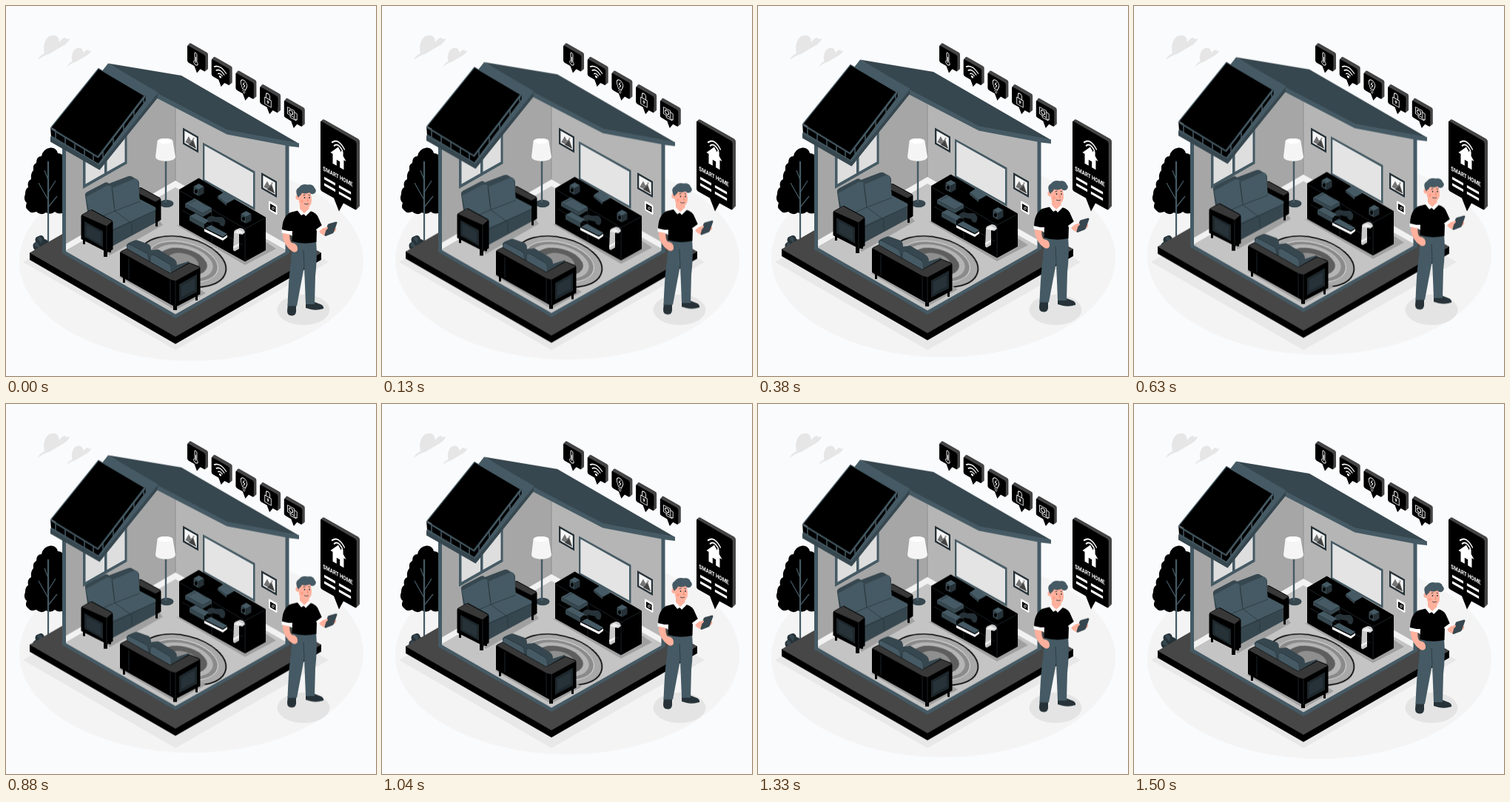
These frames come from a looping animation (500 px wide and 500 px high, 1.54 s). An HTML page:

```html
<!DOCTYPE html>
<html lang="en">
<head>
<meta charset="utf-8">
<title>Smart home</title>
<style>
html,body{margin:0;width:100%;height:100%;overflow:hidden;background:#fafbfd}
svg{display:block;width:100%;height:100%}
.k{fill:#000}.d{fill:#37474f}.s{fill:#455a64}.n{fill:#263238}.w{fill:#fff}
.g{fill:#e6e6e6}.skin{fill:#ffb19d}.top{fill:#383838}.inset{fill:#1d272c}
.line{fill:none;stroke:#455a64;stroke-linejoin:round}
.dark{fill:none;stroke:#263238;stroke-width:.7}
.icon{fill:none;stroke:#fff;stroke-width:1;stroke-linecap:round;stroke-linejoin:round}
text{font:bold 8px Roboto,sans-serif;fill:#fff;text-anchor:middle}
</style>
</head>
<body>
<svg viewBox="0 0 500 500">
<defs>
  <g id="frame">
    <path class="n" d="M0 0L21 12V34L0 22Z"/>
    <path fill="#f5f5f5" d="M2.300 4L18.800 13.400V30L2.300 20.600Z"/>
    <path fill="#757575" d="M3.300 19.500L8 11.500 11 17.500 14 15 18 28Z"/>
    <path fill="#424242" d="M8 23L13.500 17.500 18 28.300Z"/>
    <circle cx="14.500" cy="14.500" r="1.200" fill="#9e9e9e"/>
  </g>
  <g id="speaker">
    <path class="s" d="M0 4L7 0 14 4 7 8Z"/>
    <path class="d" d="M0 4L7 8V17L0 13Z"/>
    <path class="n" d="M7 8L14 4V13L7 17Z"/>
    <ellipse class="k" cx="3.500" cy="10.500" rx="1.900" ry="2.800"/>
  </g>
  <g id="bubble">
    <path fill="#454545" d="M0 4L3 .4Q4 0 5 .5L26 12.500Q28 13.700 28 15.500V35L24.500 38 23 17Z"/>
    <path class="k" d="M0 5Q0 3 2 4L22.500 15.700Q24.500 17 24.500 19V37Q24.500 39.300 22.500 38L17.500 35.300 13 40.500 9.500 31 2 26.700Q0 25.500 0 23.500Z"/>
  </g>
  <path id="cloud" class="g" d="M43 73Q45 67 52 64C49 53 54 41 61 40C67 38 72 42 72 49C76 43 81 41 82 45Q86 43 86 45Q82 52 75 55L58 65Q50 67 43 73Z"/>
</defs>

<ellipse class="float" cx="250.500" cy="345" rx="232.500" ry="134.500" fill="#f4f4f4"/>
<use href="#cloud"/>
<use href="#cloud" transform="translate(50.500 27) scale(.75)"/>
<path fill="#e8e8e8" d="M23 346L229 227 436 346 229 465Z"/>
<ellipse cx="402" cy="410.500" rx="35.500" ry="20.500" fill="#e4e4e4"/>

<g id="tree">
  <path class="k" d="M60 191.500Q68 191 70 199Q77 199 80 207V278Q72 283 66 278Q60 283 54 279Q47 284 41 278Q33 281 30 276Q25 273 28 266Q23 262 26 254Q26 247 30 245Q28 237 34 234Q33 226 37 222Q36 214 41 212Q41 203 48 203Q50 193 60 191.500Z"/>
  <path class="line" stroke-width="2.200" d="M57 210V323"/>
  <path class="line" stroke-width="1.300" d="M57 262L44 239M57 252L67 236M57 235L52 222M57 272L69 257"/>
  <path class="n" d="M37 327Q35 321 40 319Q38 312 44 311Q50 308 52 315Q58 316 57 322L56 330H39Z"/>
  <path class="d" d="M39 325Q37 320 42 319L47 327ZM42 314Q46 309 49 315L48 321Z"/>
</g>

<g id="bubbles">
  <use href="#bubble" x="245" y="50"/>
  <use href="#bubble" x="277.700" y="68.600"/>
  <use href="#bubble" x="310.400" y="87.200"/>
  <use href="#bubble" x="343.100" y="105.800"/>
  <use href="#bubble" x="375.800" y="124.400"/>
</g>
<g class="icon">
  <g transform="matrix(.9 .5 0 .9 256.500 72)">
    <path d="M-1.600 3V-8A1.600 1.600 0 0 1 1.600 -8V3A3 3 0 1 1 -1.600 3Z"/><path d="M0 -3V5"/>
  </g>
  <g transform="matrix(1 .57 0 1 289.500 90)">
    <path d="M-8 -3.500Q0 -11 8 -3.500M-5.300 0Q0 -5.500 5.300 0M-2.700 3Q0 .5 2.700 3" stroke-width="1.400"/><circle cy="5.800" r="1" fill="#fff"/>
  </g>
  <g transform="matrix(.85 .5 0 .95 321.500 108)">
    <path d="M-2.500 5C-2.500 2 -5 1 -5 -3A5 5 0 0 1 5 -3C5 1 2.500 2 2.500 5ZM-2 7.500H2M-1 9.800H1M.8 -5L-1.500 -1.300H1.500L-.6 2.500"/>
  </g>
  <g transform="matrix(.85 .5 0 .95 354 127)">
    <path d="M-5 -1.500H5V8H-5ZM-3 -1.500V-6A3 3 0 0 1 3 -6V-1.500M0 3.500V5.200"/><circle cy="2.500" r="1.200"/>
  </g>
  <g transform="matrix(.95 .54 0 .95 387 145.500)">
    <path d="M-6.500 -5.500H3V4H-6.500ZM3 -3.500H6.500V5.500H2M-3 4V7H5V5.500" stroke-width=".8"/><circle cx="-2" cy="-.8" r="2.700"/>
  </g>
</g>

<g id="sign">
  <path fill="#454545" d="M425 156L428 153.500Q429.500 153 431 154L476 179.500Q478 181 478 183V270.500L473.500 275 472 184Z"/>
  <path class="k" d="M425 157.500Q425 155 427 156.300L471.500 182Q473.800 183.500 473.800 186V274Q473.800 276.300 471.500 275L456 266.500 450 277.500 443 259.500 427 250.500Q425 249 425 247Z"/>
  <g transform="matrix(.88 .5 0 1 449 204)">
    <path class="icon" style="stroke-width:1.800" d="M-9.500 -15Q0 -26 9.500 -15M-6.300 -12Q0 -19.500 6.300 -12"/>
    <path class="w" d="M0 -13.500L12 0H8.500V13H2.500V5H-2.500V13H-8.500V0H-12ZM4.500 -11H7.500V-4L4.500 -7Z"/>
    <path class="w" d="M-21.500 37.500H-4.500V41H-21.500ZM1 37.500H19.500V41H1ZM-21.500 46H-4.500V49.500H-21.500ZM1 46H19.500V49.500H1Z"/>
  </g>
  <text transform="matrix(.78 .43 0 1 448.500 233)">SMART HOME</text>
</g>

<g id="shell" class="float">
  <path class="k" d="M32 333L229 446 426 333V343L229 456.700 32 343Z"/>
  <path fill="#474747" d="M32 333.500L229 220 426 333.500 229 447Z"/>
  <path class="s" d="M76 331L229 242 383 331V334L229 422 76 334Z"/>
  <path fill="#c4c4c4" d="M80 331L229 244 380 331 229 416.500Z"/>
  <path fill="#a6a6a6" d="M80 331V185L205 112 229 125V244Z"/>
  <path fill="#b5b5b5" d="M229 122L300 160 380 180V331L229 244Z"/>
  <path fill="#f2f2f2" d="M80 331V322L229 236 380 322V331L229 245Z"/>
  <path d="M229 125V236" stroke="#8c8c8c" stroke-width=".8"/>
  <path class="s" d="M76 180H81V333.500L76 331ZM377.500 185H382.500V331L377.500 333Z"/>
  <path class="s" d="M266 184.500L336.500 223.500V276L266 236Z"/>
  <path fill="#e4e4e4" d="M268.300 188.500L334 225.500V271.500L268.300 234.500Z"/>
</g>

<g id="fixtures">
  <path class="s" d="M104 198L163.500 162V213L104 247Z"/>
  <path fill="#dedede" d="M107.500 196L133 180V226L107.500 240.500ZM136.500 178L160.500 164V210.500L136.500 224Z"/>
  <use href="#frame" x="239" y="164.500"/>
  <use href="#frame" x="345" y="225"/>
  <path class="w" d="M355 264.500Q355 263 357 264L365 268.500Q366.500 269.500 366.500 271V281Q366.500 282.500 365 281.700L357 277Q355 276 355 274Z"/>
  <path class="k" d="M357 267L364.500 271.300V279L357 274.700Z"/>
  <circle cx="361" cy="273.300" r="1.500" fill="none" stroke="#fff" stroke-width=".8"/>

  <ellipse class="d" cx="217" cy="267" rx="9.500" ry="5.300"/>
  <path class="line" stroke-width="2.400" d="M216 205V266"/>
  <path fill="#f5f5f5" d="M204.500 183C205 177.500 225 177.500 225.500 183L229 204C228 211.500 203 211.500 202 204Z"/>
  <ellipse class="w" cx="215" cy="182.500" rx="10.300" ry="3.600"/>

  <g id="rug" transform="translate(239.500 345.500) rotate(14)">
    <ellipse rx="59" ry="32.500" fill="#a8a8a8" stroke="#000" stroke-width="1.700"/>
    <ellipse rx="48" ry="26" fill="#8a8a8a" stroke="#e0e0e0"/>
    <ellipse rx="41" ry="22" fill="#b5b5b5"/>
    <ellipse rx="33" ry="17.500" fill="#5e5e5e"/>
    <ellipse rx="21" ry="11" fill="#8f8f8f"/>
  </g>
</g>

<g id="roof" class="float">
  <path class="d" d="M138 77.500L237 94 396 186 299 168 204 119Z"/>
  <path class="s" d="M203 117L299 167.500 396 185.500V191L383 189.500 298.500 173.500 203 124Z"/>
  <path class="s" d="M138 77.500L205 116.500V123L126.500 221.500 60 183V177Z"/>
  <path class="d" d="M205 118V124L126.500 221.500V215ZM60 178L126.500 215.500V221.500L60 183.500Z"/>
  <path class="k" d="M60 164L124.500 203 188.500 121V128L125 215 61 177Z"/>
  <path class="line" stroke-width="2" d="M60.500 165.500L124.500 204.500 188 122M61 176L125 214 188 130"/>
  <path class="line" stroke-width="1.500" d="M67 170V179M80 178V187M93 186V195M106 194V203M118 201V210M131 197V205M145 179V187M159 160V168M173 142V150M186 124V131"/>
  <path class="k" d="M125 84.500L186.500 121 124 202.500 61 164Z"/>
  <path class="line" stroke-width="1.200" d="M61 164L125 84.500 187 121"/>
</g>

<g id="furniture" class="float">
  <g id="console">
    <path fill="#a0a0a0" d="M230 296L323 350 365 328 350 318Z"/>
    <path class="k" d="M234 248L260.500 232.500 351 285.500V330L323 345.500 234 296Z"/>
    <path class="dark" d="M234 249L323 301 351 286M323 301V345M238 276L320 323M278 277V320"/>
    <use href="#speaker" x="253.500" y="240"/>
    <use href="#speaker" x="317.500" y="277"/>
    <path class="s" d="M286 257L296 250.500 309 261 298 267Z"/><path class="d" d="M286 257L298 267V270L286 260Z"/>
    <path class="s" d="M242 267L255 260 278 273 266 280Z"/><path class="d" d="M242 267L266 280V285L242 272ZM266 280L278 273V278L266 285Z"/>
    <path class="dark" d="M247 267L258 261.500 272 271"/>
    <path class="n" d="M270 289Q275 281 283 285L292 285Q299 289 295 297Q290 299 288 293L279 291Q273 295 270 289Z"/>
    <path class="s" d="M248 284L256 280 274 290 268 295Z"/><path class="d" d="M248 284L268 295V301L248 290Z"/>
    <path class="s" d="M269 300L277 296 299 308 293 312Z"/>
    <path class="w" d="M268 301L293 313.500 299 309.500V312.500L293 317 268 304.500Z"/>
    <path fill="#c9c9c9" d="M308 306Q308 303 311 302L316 300Q322 300 323 306L319.500 309 315 308V328L309 331.500 307 330Z"/>
    <path fill="#eee" d="M308 306L314 302 322 306 315 308ZM307 325L315 321V324L307 328Z"/>
  </g>

  <g id="sofa">
    <path fill="#a0a0a0" d="M140 337L212 296 206 288 130 325Z"/>
    <path class="k" d="M172 250L180 245.500Q182 244.500 184 246L208 259Q209.500 260 209.500 262V289L203 293 200 290 172 268ZM202 290H205V298H202Z"/>
    <path class="top" d="M173 250L181 245.500 209 260.500 202 264.500Z"/>
    <path class="d" d="M107 257Q106 253 110 251L133 239Q137 237 139 240L164 230.500Q168 229 171 231L177 234.500Q180 236 180 240V268L147 287 112 292Z"/>
    <path class="s" d="M112 256L136 243Q142 241 143 246L147 279 116 292Q112 276 108 258Z"/>
    <path class="s" d="M144 246L172 234Q178 232 178.500 237L181 264 148 279Z"/>
    <path class="s" d="M112 288L147 272 181 261 202 272Q203 274 202 277L169 296 145 307Z"/>
    <path class="d" d="M143 302L202 276V293L143 325Z"/>
    <path class="dark" d="M143 246L147 277 170 294V308M147 277L115 291M147 277L181 264M143 304L202 276"/>
    <path class="k" d="M101.500 284Q101.500 282 104 281L114 275.500Q116 274.500 118 276L142 289Q144.500 290 144.500 293V329L137 333 101.500 315ZM104 314H107V322H104ZM132 329H137V339H132ZM139 326H142V333H139Z"/>
    <path class="top" d="M102.500 282.500L115 275.500 143.500 291 136 297.500Z"/>
    <path class="inset" d="M106 291L131 304.500V326L106 312Z"/>
    <path class="n" d="M109 295.500L128 306V321.500L109 311Z"/>
    <path class="dark" d="M136 298V333"/>
  </g>

  <g id="couch">
    <path fill="#a0a0a0" d="M152 366L229 411 270 388 250 375Z"/>
    <path class="d" d="M163 326Q162 322 166 320L173 317Q176 315.500 179 317L193 322Q196 324 196 330L206 329 226 341Q231 344 231 350L247 345 251 352 228 371 164 340Z"/>
    <path class="s" d="M163 325Q164 320 169 323L190 334Q193 336 193 341V352L164 337ZM195 340Q195 334 201 337L221 349Q224 351 224 355V370L195 353Z"/>
    <path class="dark" d="M163 325Q164 320 169 323L190 334Q193 336 193 352M195 352V340Q195 334 201 337L221 349Q224 351 224 366"/>
    <path class="k" d="M154 334Q154 332 156 331L163 327.500 222 361 246 347.500Q248 346.500 250 347.500L261 352Q262.500 353 262.500 355V389.500L229 407 154 365ZM158 366H161V374H158ZM226 402H231V411H226ZM256 389H259V398H256Z"/>
    <path class="top" d="M155 332.500L163 328 222 361.500 248 347.500 262 353.500 229 371.500 222 369.500Z"/>
    <path class="dark" d="M166 341V369M222 370V402M229 372V406"/>
    <path class="inset" d="M234 376L258 362.500V386.500L234 399Z"/>
    <path class="n" d="M237 378L255 368V384L237 393.500Z"/>
  </g>
</g>

<g id="man" class="float">
  <path class="n" d="M381 402H392V409Q393 418 387 418.500Q380 419 380 412ZM405 400H417L426 403.500Q430 406 429 409Q420 412 412 410L405 408Z"/>
  <path class="s" d="M387 316H419Q421 340 418 365L417 403H405L403 352 393 405.500H380.500Q382 365 385 347Z"/>
  <path class="dark" d="M403 352L402 330"/>
  <path class="skin" d="M374 303L384 305Q382 316 386 320Q395 321 394 330Q391 335 386 331Q377 325 374 312Z"/>
  <path class="skin" d="M420 298L426 295 431 302Q437 297 439 300L446 300Q447 303 444 305L437 308Q430 313 424 306Z"/>
  <path class="k" d="M396 276L411 277Q420 279 423 288L427 297 420 303 419.500 319Q402 323 386.500 318L387 304 373 304Q373 285 384 279Z"/>
  <path class="w" d="M372.500 302L386 305 385 309 372.500 306.500ZM419 302L428 295.500 430 299 421 306Z"/>
  <path class="skin" d="M397 264L410 268 409 277 403 282 397 275Z"/>
  <path class="w" d="M395 272L403 280 409 274.500 412 277 405 284 402.500 281 399 283 393.500 276Z"/>
  <path class="skin" d="M395 251Q398 246 411 248L413 261Q413.500 272 405 272.500Q396 271 395.500 262Q390.500 262 391.500 257.500Q392 254 395 256Z"/>
  <path class="s" d="M395 259Q389 249 396 245Q400 239.500 408 241.500Q415 240.500 417 246Q421 250 416.500 253.500Q413 255.500 410 252Q405 254.500 400 252.500Q399 256 396.500 257Z"/>
  <circle class="n" cx="403.500" cy="259" r=".9"/><circle class="n" cx="410" cy="259" r=".9"/>
  <path d="M401.500 256L404.500 255M408.500 255L411 256M403 267Q406 269 409 267" fill="none" stroke="#263238" stroke-width=".8"/>
  <path d="M407 259L408.500 263.500H406.500" fill="none" stroke="#e8806c" stroke-width=".8"/>
  <circle cx="400" cy="264" r="1.800" fill="#ff9985"/>
  <path class="d" d="M434.500 296Q435 294.500 437 294L446 291.500Q448 291.500 447.500 293L443 305.500Q442.500 307 441 307.500L432 311Q430 311 430.500 309.500Z"/>
  <path class="skin" d="M428 301L434 298.500Q436 299.500 434 301.500L430 305Z"/>
</g>
</svg>
<script>
const LOOP = 1540, TOP = 750, REST = 1500;
const easing = 'steps(18)'; // 24 poses per second
const at = (ms, y) => ({offset: ms / LOOP, transform: `translateY(${y}px)`, easing});

for (const part of document.querySelectorAll('.float')) {
  const anim = part.animate(
    [at(0, 0), at(TOP, -10), at(REST, 0), at(LOOP, 0)],
    {duration: LOOP, iterations: Infinity, delay: -4}
  );
  anim.startTime = 0;
}
</script>
</body>
</html>
```
